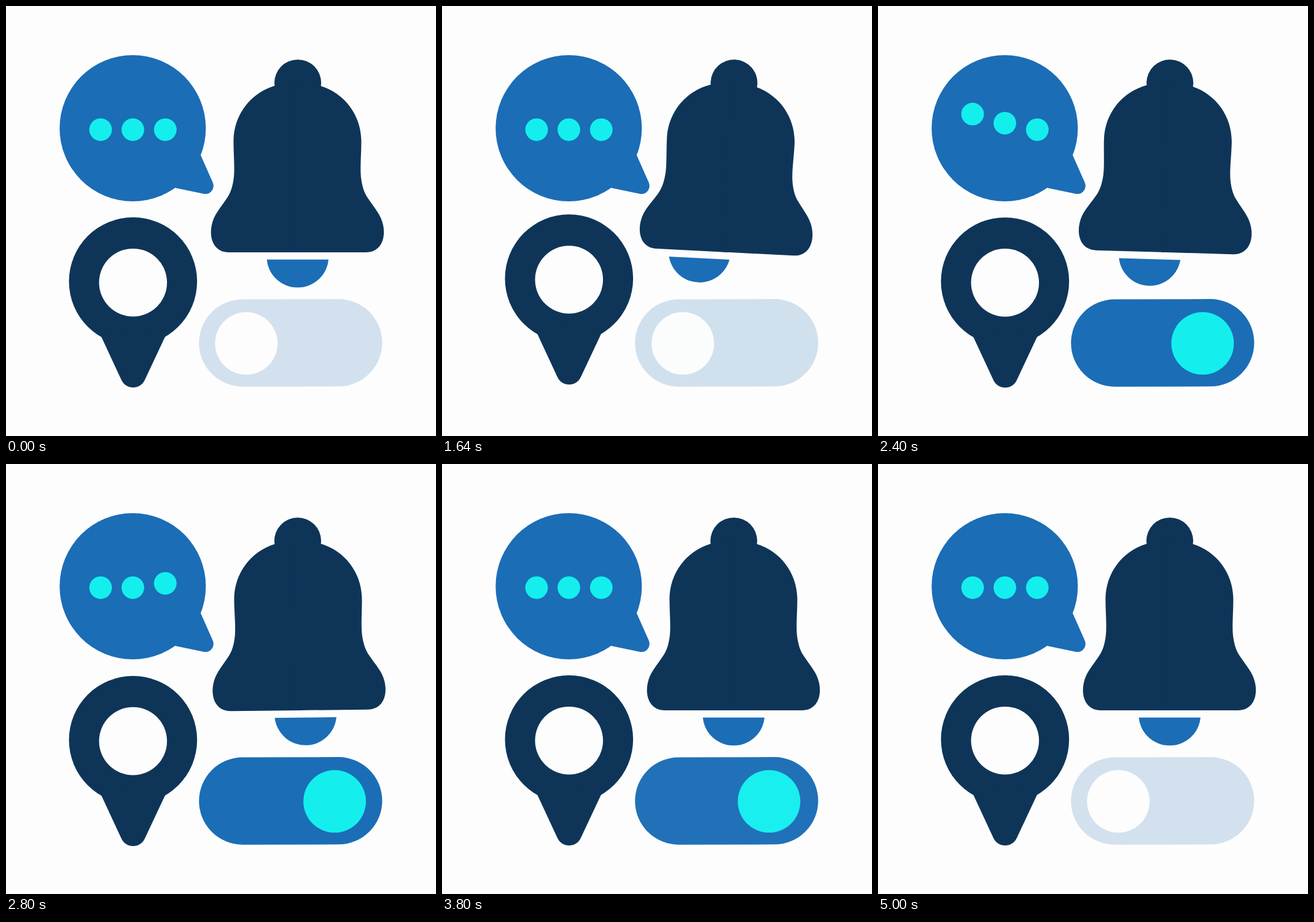
An HTML page that plays this animation: 700 px wide and 700 px high, repeating every 5040 ms.

```html
<!DOCTYPE html>
<html lang="en">
<head>
<meta charset="utf-8">
<title>Notification icons</title>
<style>
  html, body { margin: 0; height: 100%; overflow: hidden; background: #fdfdfd; }
  svg { display: block; width: 100%; height: 100%; }
  .navy { fill: #0e3558; }
  .blue { fill: #1b6db6; }
  .paper { fill: #fdfdfd; }
  .dot { fill: #14efee; }
</style>
</head>
<body>
<svg viewBox="0 0 700 700">
  <clipPath id="belowBell"><rect x="300" y="412.8" width="350" height="100"/></clipPath>

  <g class="blue">
    <circle cx="206.3" cy="199" r="119"/>
    <path d="M317 243L336.5 287C341 297 333 308 322 305.8L275 296L260 250Z"/>
  </g>
  <circle class="dot" cx="154" cy="201.3" r="18.4"/>
  <circle class="dot" cx="206.5" cy="201.3" r="18.4"/>
  <circle class="dot" cx="259.3" cy="201.3" r="18.4"/>

  <g id="pin">
    <circle class="navy" cx="206.8" cy="448.3" r="104.3"/>
    <path class="navy" d="M154.5 537L187.5 608C195 625.3 219 625.3 226.3 608L259.7 537L206.8 520Z"/>
    <circle class="paper" cx="206.8" cy="450.2" r="55.3"/>
  </g>

  <line id="track" x1="385.3" y1="548.6" x2="541.3" y2="548.2" stroke-width="142.2" stroke-linecap="round"/>
  <circle id="knob" cy="549.2" r="50.9"/>

  <g id="bell">
    <g class="navy">
      <circle cx="475" cy="125.3" r="38.1"/>
      <path id="half" d="M480 126L437 130C398 142 371 177 370.4 219C370.3 240 372.5 262 371 278C369.5 292 366 304 359.5 313C349 329 338 340 334.8 357C330.5 378 338 401 363 401L480 401Z"/>
      <use href="#half" transform="matrix(-1 0 0 1 948.8 0)"/>
    </g>
    <g clip-path="url(#belowBell)">
      <circle id="clapper" class="blue" cx="474.8" cy="407.8" r="50.5"/>
    </g>
  </g>
</svg>
<script>
const LOOP = 5040;
const $ = id => document.getElementById(id);
const dots = document.querySelectorAll('.dot');

// [time in ms, value] pairs, eased between neighbours
const BELL = [[1220, 0], [1635, 2.9], [2050, -2.9], [2467, 2], [2883, -0.96], [3300, 0]];
const PIN = [[1400, 0], [1850, -8.5], [2200, 4.5], [2550, -2.6], [2900, 1.8], [3250, -0.8], [3600, 0]];
const DOT = [[0, 0], [200, -27.5], [400, 0]];
const DOT_STARTS = [500, 2167, 3833];
const DOT_STAGGER = 150;
const SWITCH_ON = 1600, SWITCH_OFF = 3728;

const LIGHT = [211, 225, 238], BLUE = [27, 109, 182];
const PAPER = [253, 253, 253], CYAN = [20, 239, 238];

const smooth = u => {
  u = Math.min(1, Math.max(0, u));
  return u * u * (3 - 2 * u);
};

function sample(keys, t) {
  let value = keys[0][1];
  for (let i = 1; i < keys.length; i++) {
    const [start, from] = keys[i - 1], [end, to] = keys[i];
    value += (to - from) * smooth((t - start) / (end - start));
  }
  return value;
}

const switched = (t, duration) =>
  smooth((t - SWITCH_ON) / duration) - smooth((t - SWITCH_OFF) / duration);

const mix = (a, b, k) => `rgb(${a.map((v, i) => Math.round(v + (b[i] - v) * k))})`;

function draw(t) {
  dots.forEach((dot, i) => {
    const hop = DOT_STARTS.reduce((sum, s) => sum + sample(DOT, t - s - i * DOT_STAGGER), 0);
    dot.setAttribute('cy', 201.3 + hop);
  });

  const swing = sample(BELL, t);
  $('bell').setAttribute('transform', `rotate(${swing} 474.5 133)`);
  $('clapper').setAttribute('transform', `rotate(${swing * 5.5} 474.8 255)`);

  $('pin').setAttribute('transform', `translate(0 ${sample(PIN, t)})`);

  $('knob').setAttribute('cx', 391.2 + 143.8 * switched(t, 920));
  $('knob').setAttribute('fill', mix(PAPER, CYAN, switched(t, 820)));
  $('track').setAttribute('stroke', mix(LIGHT, BLUE, switched(t, 700)));
}

const origin = performance.now();
function frame() {
  draw((performance.now() - origin) % LOOP);
  requestAnimationFrame(frame);
}
frame();
</script>
</body>
</html>
```
